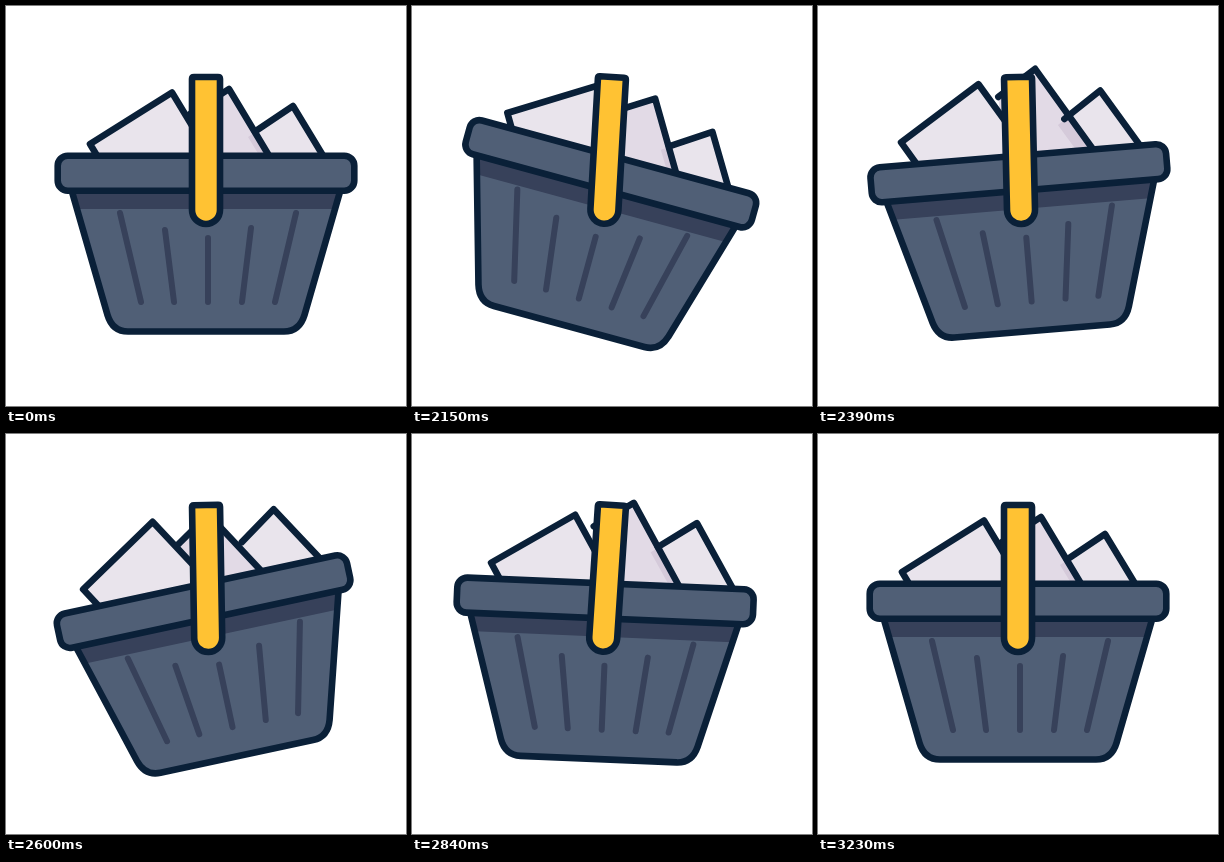
An HTML page for the animation above (3.29 s loop, 400 by 400 pixels).

```html
<!DOCTYPE html>
<html>
<head>
<meta charset="utf-8">
<style>
  html, body { margin: 0; width: 100%; height: 100%; overflow: hidden; background: #fff; }
  svg { display: block; width: 100vw; height: 100vh; }
  .line { stroke: #0a2038; stroke-width: 6.6; stroke-linejoin: round; stroke-linecap: round; }
</style>
</head>
<body>
<svg viewBox="0 0 400 400" fill="none">
  <clipPath id="middle"><path class="paper2" d="M184 108L223 83L280 178H184Z"/></clipPath>
  <g id="swing">
    <g id="basket">
      <path class="paper3" fill="#e9e4ec" d="M249 125.500L287 100L333 176H270L244 130Z"/>
      <path class="paper2" fill="#e2dae6" d="M184 108L223 83L280 178H184Z"/>
      <g clip-path="url(#middle)">
        <path class="paper3" fill="#d5cada" d="M242 131L262 118L292 170L272 180Z"/>
      </g>
      <path class="line paper3" d="M249 125.500L287 100L333 176"/>
      <path class="line paper2" d="M184 108L223 83L280 178"/>
      <path class="line paper1" fill="#e9e4ec" d="M108 178L84 138L166 86.500L220 176"/>

      <path fill="#505f76" d="M66 184L102 309Q107 325 122 325H278Q293 325 298 309L334 184Z"/>
      <path fill="#37415a" d="M66 184H334L328.500 203H71.500Z"/>
      <path stroke="#37415a" stroke-width="6" stroke-linecap="round"
        d="M114 207L135 296M159 224L168 296M202 232V296M245 222L236 296M290 207L269 296"/>
      <path class="line" d="M65.500 184L101.500 309Q106.500 325.500 122 325.500H278Q293.500 325.500 298.500 309L334.500 184"/>
      <rect class="line" fill="#505f76" x="51.700" y="149.700" width="296.600" height="35" rx="10"/>
    </g>
    <path class="line" fill="#ffc233" d="M188 71H212Q214 71 214 73V204A14 14 0 0 1 186 204V73Q186 71 188 71Z"/>
  </g>
</svg>
<script>
const LOOP = 3290, STEP = 30, HOP = 400;
const keyTimes = [2000, 2250, 2500, 2735, 2970, 3210];
const handleKeys = [0, 5, -5.6, 6.5, 0, 0];
const basketKeys = [0, 23.3, -24, 7, -4, 0];
const paperStarts = [2105, 2190, 2295];

const swing = document.getElementById('swing');
const basket = document.getElementById('basket');
const papers = [1, 2, 3].map(n => document.querySelectorAll('.paper' + n));

// Cosine easing between neighbouring keys
function track(values, t) {
  if (t <= keyTimes[0]) return values[0];
  const i = keyTimes.findIndex(k => k > t);
  if (i < 0) return values[values.length - 1];
  const f = (t - keyTimes[i - 1]) / (keyTimes[i] - keyTimes[i - 1]);
  return values[i - 1] + (values[i] - values[i - 1]) * (1 - Math.cos(Math.PI * f)) / 2;
}

// Two hops, the second one lower
function hop(start, t) {
  const n = (t - start) / HOP;
  if (n < 0 || n >= 2) return 0;
  return (n < 1 ? 18.5 : 17.5) * Math.sin(Math.PI * n) ** 2;
}

function draw(now) {
  const time = now % LOOP;
  const t = Math.floor((time - 20) / STEP) * STEP + 20;
  const handle = track(handleKeys, t);
  swing.setAttribute('transform', `rotate(${handle} 200 71)`);
  basket.setAttribute('transform', `rotate(${track(basketKeys, t) - handle} 200 188)`);
  papers.forEach((parts, i) => {
    const rise = hop(paperStarts[i], t);
    parts.forEach(part => part.setAttribute('transform', `translate(${rise * 0.1} ${-rise})`));
  });
  requestAnimationFrame(draw);
}
requestAnimationFrame(draw);
</script>
</body>
</html>
```
